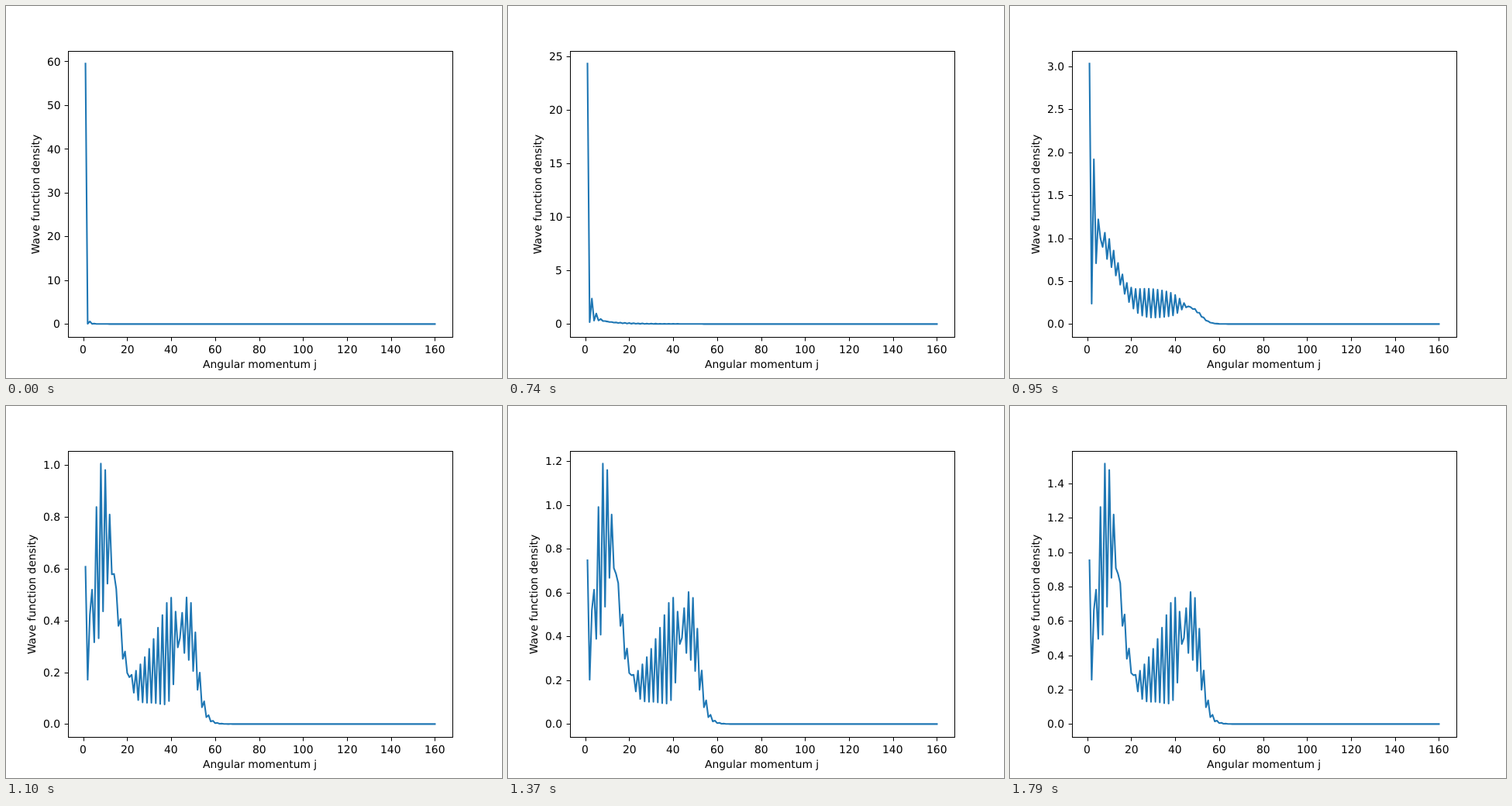
Recreate the animation shown at these times as an HTML page. Size 640 by 480 pixels, loop 1820 ms.

```html
<!DOCTYPE html>
<html lang="en">
<head>
<meta charset="utf-8">
<title>Wave function density</title>
<style>
html, body { margin: 0; width: 100%; height: 100%; overflow: hidden; background: #fff; }
svg { display: block; width: 640px; height: 480px; }
text { font: 13.889px "DejaVu Sans", sans-serif; fill: #000; text-rendering: geometricPrecision; }
.axis { fill: none; stroke: #000; stroke-width: 1; }
.curve { fill: none; stroke: #1f77b4; stroke-width: 2.083; stroke-linejoin: round; stroke-linecap: square; }
</style>
</head>
<body>
<svg viewBox="0 0 640 480">
  <path class="curve" id="curve"/>
  <rect class="axis" x="80.5" y="58.5" width="496" height="369"/>
  <path class="axis" id="xTicks"/>
  <path class="axis" id="yTicks"/>
  <g id="xLabels"></g>
  <g id="yLabels"></g>
  <text x="254" y="467">Angular momentum j</text>
  <text id="yTitle" text-anchor="middle">Wave function density</text>
</svg>
<script>
const LOOP = 1820, STEP = 30, START = 500;
const COUNT = 160, ZERO_Y = 410.4, HEIGHT = 336;
const MID = 12, LATE = 20;   // steps at which the spread and settled shapes are reached
const FLOOR = 1e-4;

const $ = id => document.getElementById(id);
const { exp, log, cos, round, floor, max, PI } = Math;

const bump = (j, center, width) => exp(-(((j - center) / width) ** 2));
const cutoff = (j, edge, width) => 1 / (1 + exp((j - edge) / width));
const mixLog = (a, b, w) => exp(log(a) * (1 - w) + log(b) * w);

// Every shape is a smooth mean with a swing that alternates between even and odd j.
const zigzag = (j, mean, swing) => max(FLOOR, mean + (j % 2 ? -swing : swing));

function early(j, n) {
  if (j === 1) return 59.36 - .04 * Math.min(n, 0);
  return .1 * exp(-j / 5) + (j % 2 ? 8 * exp(-.9 * j) : 0) + FLOOR;
}

function spread(j) {
  const x = j - 1, edge = cutoff(j, 52, 2);
  const mean = 3.1 * exp(-x / 4) + .897 * exp(-j / 26);
  const swing = .25 * bump(j, 24, 15) - 4.01 * exp(-.27 * x - .025 * x * x);
  return zigzag(j, mean * edge, swing * edge);
}

function settled(j) {
  const shelf = .298 * exp((j - 31) / 21) * cutoff(j, 51.2, 1.8);
  const hill = 1.01 * bump(j, 10, 7.24) + .22 * exp((1 - j) / 3);
  const ripple = .68 * bump(j, 0, 13.5) * cos(PI * (j - 8.55) / 10.5);
  const tilt = (.87 + .028 * (j - 29)) * cutoff(j, 42.3, 1.4) - .37;
  return zigzag(j, shelf + hill, ripple + shelf * tilt);
}

// The settled shape breathes; odd j trail a little at first.
function breathing(j, n) {
  const peak = 1.5865 - .303 * (1 - cos((n - 39.2) * 10.6 * PI / 180));
  const trail = j % 2 ? .04 * max(0, 1 - (n - LATE) / 9) : 0;
  return settled(j) / settled(8) * peak * (1 - trail);
}

function density(j, n) {
  if (n < 0) return early(j, n);
  if (n < MID) {
    const w = n / MID;
    return mixLog(early(j, n), spread(j), j === 1 ? w * w : w);
  }
  if (n < LATE) return mixLog(spread(j), breathing(j, LATE), (n - MID) / (LATE - MID));
  return breathing(j, n);
}

// Smallest round tick distance giving at most nine intervals.
function tickSize(range) {
  const raw = range / 9, unit = 10 ** floor(Math.log10(raw));
  return unit * [1, 2, 2.5, 5, 10].find(s => s * unit >= raw - 1e-9);
}

const decimalsOf = size => [0, 1, 2].find(d => Math.abs(size * 10 ** d - round(size * 10 ** d)) < 1e-6);
const xOf = j => 102.545 + (j - 1) * 450.909 / 159;
const yOf = (v, peak) => ZERO_Y - HEIGHT * v / peak;
const snap = v => floor(v + .5) + .5;
const widthOf = s => [...s].reduce((sum, c) => sum + (c === "." ? 4.415 : 8.836), 0);
const label = (x, y, s) => `<text x="${round(x)}" y="${round(y)}">${s}</text>`;

function drawXAxis() {
  let marks = "", labels = "";
  for (let j = 0; j <= COUNT; j += 20) {
    const x = xOf(j), s = String(j);
    marks += `M${snap(x)} 427.5v4.86`;
    labels += label(x - widthOf(s) / 2, 448, s);
  }
  $("xTicks").setAttribute("d", marks);
  $("xLabels").innerHTML = labels;
}

function drawYAxis(peak) {
  const size = tickSize(peak * 1.1), digits = decimalsOf(size);
  let marks = "", labels = "", widest = 0;
  for (let i = 0; i * size <= peak * 1.05; i++) {
    const y = yOf(i * size, peak), s = (i * size).toFixed(digits), width = widthOf(s);
    marks += `M80.5 ${snap(y)}h-4.86`;
    labels += label(70.28 - width, y + 5.07, s);
    widest = max(widest, width);
  }
  $("yTicks").setAttribute("d", marks);
  $("yLabels").innerHTML = labels;
  $("yTitle").setAttribute("transform", `translate(${round(60.4 - widest)} 243) rotate(-90)`);
}

function draw(n) {
  const values = Array.from({ length: COUNT }, (_, i) => density(i + 1, n));
  const peak = max(...values);
  const points = values.map((v, i) => `${xOf(i + 1).toFixed(2)} ${yOf(v, peak).toFixed(2)}`);
  $("curve").setAttribute("d", "M" + points.join("L"));
  drawYAxis(peak);
}

// Three slow steps come before the steady ones.
function stepAt(t) {
  if (t < 190) return -3;
  if (t < 320) return -2;
  if (t < START) return -1;
  return floor((t - START) / STEP);
}

const begin = performance.now();
let shown = null;

function tick() {
  const n = stepAt((performance.now() - begin) % LOOP);
  if (n !== shown) draw(shown = n);
  requestAnimationFrame(tick);
}

drawXAxis();
tick();
</script>
</body>
</html>
```
